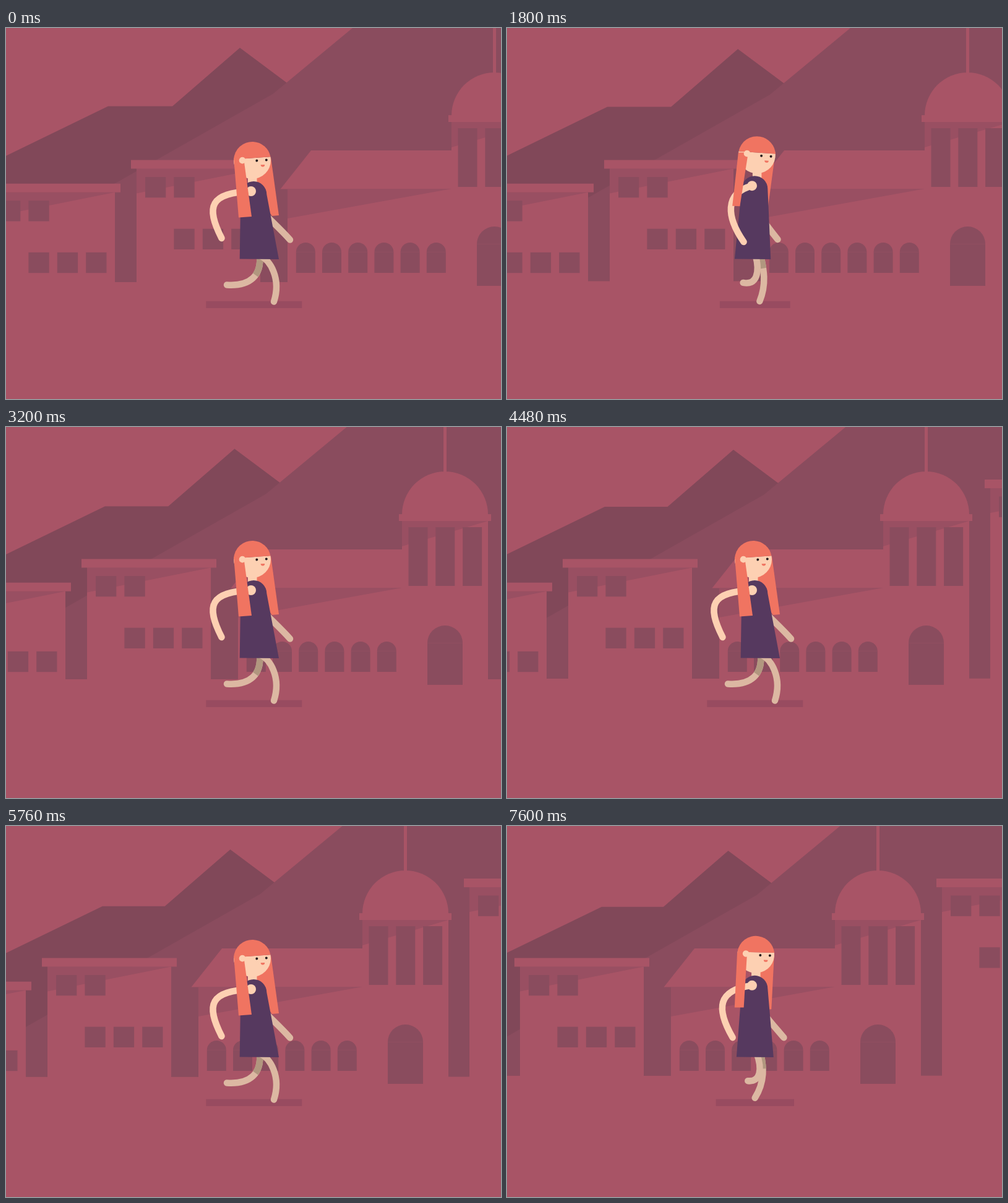
Animation, 800 px wide and 600 px high, one loop 7.64 s. Source, as an HTML page with a canvas:

```html
<!DOCTYPE html>
<html lang="en">
<head>
<meta charset="utf-8">
<title>Walking through town</title>
<style>
html, body { margin: 0; width: 100%; height: 100%; overflow: hidden; background: #a85466; }
canvas { display: block; }
</style>
</head>
<body>
<canvas id="stage" width="800" height="600"></canvas>
<script>
const ctx = document.getElementById('stage').getContext('2d');
const BASE = '#a85466', NEAR = '#8a4c5e', FAR = '#814859', SHADE = '#994f62', FLOOR = '#984b60';
const HAIR = '#f07461', SKIN = '#fdd0b2', DIM = '#dcb8a2', DARK = '#b1977f', DRESS = '#56395f';
const STEP = 40, LOOP = 7640, CYCLE = 640, TAU = 2 * Math.PI;

const mix = (a, b, k) => a + (b - a) * k;

function poly(color, ...p) {
  ctx.fillStyle = color;
  ctx.beginPath();
  for (let i = 0; i < p.length; i += 2) ctx.lineTo(p[i], p[i + 1]);
  ctx.fill();
}

function box(color, x, y, w, h) {
  ctx.fillStyle = color;
  ctx.fillRect(x, y, w, h);
}

function disc(color, x, y, r, from = 0, to = TAU) {
  ctx.fillStyle = color;
  ctx.beginPath();
  ctx.arc(x, y, r, from, to);
  ctx.fill();
}

function arch(x, top, w, bottom) {
  const r = w / 2;
  disc(NEAR, x + r, top + r, r, Math.PI);
  box(NEAR, x, top + r, w, bottom - top - r);
}

// One bent limb; a length limits it to its upper part.
function limb(color, p, length) {
  ctx.strokeStyle = color;
  ctx.lineWidth = 10.5;
  ctx.lineCap = length ? 'butt' : 'round';
  ctx.setLineDash(length ? [length, 999] : []);
  ctx.beginPath();
  ctx.moveTo(p[0], p[1]);
  ctx.bezierCurveTo(...p.slice(2));
  ctx.stroke();
}

function mountains(k) {
  const layer = (shift, color, ...points) => {
    const s = 1 - 0.04 * k;
    ctx.save();
    ctx.translate(-135 + shift * k, 230);
    ctx.scale(s, s);
    ctx.translate(135, -230);
    poly(color, ...points);
    ctx.restore();
  };
  layer(0, FAR, -100, 255.5, 165, 126.5, 269, 126.5, 378, 32, 520, 138, 520, 411, -100, 411);
  layer(-5, NEAR, -100, 408, 431.5, 106.5, 560, 0, 680, -100, 1000, -100, 1000, 411, -100, 411);
}

function house(x, y) {
  ctx.save();
  ctx.translate(x, y);
  box(BASE, 9, 14, 200, 400);
  poly(SHADE, 9, 14, 209, 14, 9, 54);
  box(BASE, 0, 0, 218, 14);
  for (let i = 0; i < 5; i++) {
    const row = i < 2 ? 0 : 1;
    box(NEAR, 23 + (i - row) * 46.4, 27.5 + row * 83.7, 33.3, 33.3);
  }
  ctx.restore();
}

function hall() {
  box(BASE, 455, 260, 266, 200);
  poly(BASE, 443.5, 260.5, 493, 198, 721, 198, 721, 260.5);
  poly(SHADE, 455, 260, 720, 260, 455, 308);
  for (let i = 0; i < 6; i++) arch(468.8 + i * 42.2, 347, 31, 396);
}

function tower() {
  box(BASE, 720, 152, 139, 300);
  poly(SHADE, 720, 152, 859, 152, 720, 193);
  disc(BASE, 789.5, 141.5, 69.5, Math.PI);
  box(BASE, 715, 141, 149, 11);
  box(BASE, 787, 0, 5, 80);
  for (let i = 0; i < 3; i++) box(NEAR, 730.5 + i * 43.8, 162, 31, 95);
  arch(761, 321, 57, 417);
}

function town(shift) {
  ctx.save();
  ctx.translate(-shift, 0);
  house(-33, 251.7);
  house(202, 213.5);
  hall();
  tower();
  house(884, 85);
  ctx.restore();
}

// Phase 0 puts the arm fully back; it sags on its way back from the front.
function arm(phase, shoulder) {
  const swing = Math.sin(TAU * phase);
  const ease = (1 - Math.cos(TAU * phase)) / 2;
  const k = ease + 0.4 * Math.max(0, swing) * (1 - ease);
  const sag = k * Math.max(0, -swing);
  return [396, shoulder,
    mix(330, 398, k), shoulder + mix(3, 24, k) + 10 * sag,
    mix(322, 428, k), mix(288, 308, k) + 40 * sag,
    mix(348.5, 459, k), mix(340, 342.5, k) + 18 * sag];
}

// Phase 0 plants the foot in front; half a cycle later it trails and swings forward.
function leg(phase) {
  const swings = phase >= 0.5;
  const u = phase * 2 % 1;
  const stride = (u + u ** 8) / 2;
  const k = swings ? 1 - stride : stride;
  const bend = 9 * Math.sin(Math.PI * u);
  const footY = swings
    ? 415.5 + 27 * u ** 8 + 6 * Math.sin(TAU * u)
    : 442.5 - 27 * u ** 8;
  return [swings ? 410 - bend : 410, 368,
    mix(427, 413, k) - bend, mix(375, 400, k) + bend / 2,
    mix(445, 395, k) - bend, mix(405, 418, k) + bend / 3,
    mix(433, 357, k), footY];
}

// Runs a drawing in the tilted frame of the head.
function tilted(x, y, angle, paint) {
  ctx.save();
  ctx.translate(x, y);
  ctx.rotate(angle);
  paint();
  ctx.restore();
}

function head(x, y, sway) {
  const angle = -0.07 * sway;
  tilted(x, y, angle, () => {
    disc(SKIN, 0, 0, 30, -0.12, Math.PI + 0.12);
    disc(HAIR, 0, 0, 30, Math.PI + 0.12, -0.12);
  });
  poly(HAIR, x - 30, y - 4, 370 + 6 * sway, 297 + 9.5 * sway,
    386.5 + 10.5 * sway, 296.5 + 8.5 * sway, x - 14, y - 4);
  tilted(x, y, angle, () => {
    disc(SKIN, -16, -1, 5.3);
    for (const eye of [7.3, 22.8]) disc('#241a1e', eye, 1, 2);
    disc(HAIR, 16.3, 8.3, 3.3, 0, Math.PI);
  });
}

function girl(t) {
  const near = t / CYCLE % 1, far = (near + 0.5) % 1;
  // The body bobs and leans once per step, a little behind the legs.
  const lag = 0.35;
  const sway = Math.cos(2 * TAU * near - lag) / Math.cos(lag);
  const x = 401 - 3 * sway, y = 209.5 + 4.5 * sway;
  const chest = y + 55, shoulder = y + 50;
  const shadow = 67 + 10.5 * sway;

  box(FLOOR, 400.8 - shadow, 441.7, 2 * shadow, 11.3);
  limb(DIM, arm(far, shoulder));
  limb(DIM, leg(far));
  limb(DARK, leg(far), 27 + 6 * sway);
  limb(DIM, leg(near));

  const backX = 431 + 10 * sway, backY = 298 + 5 * sway;
  poly(HAIR, x + 30, y - 5, backX, backY, backX - 11, backY + 1, 404, chest, x + 3, y + 15);
  box(SKIN, x - 7, y + 20, 14.5, 22);

  ctx.fillStyle = DRESS;
  ctx.beginPath();
  ctx.arc(400.3, chest, 21, Math.PI, 0);
  ctx.lineTo(433.5 + 7.5 * sway, 374);
  ctx.lineTo(372.7 + 5 * sway, 373.5);
  ctx.fill();

  limb(SKIN, arm(near, shoulder));
  disc(SKIN, 396, shoulder, 8);
  head(x, y, sway);
}

function draw(now) {
  const frame = Math.floor((now % LOOP) / STEP);
  box(BASE, 0, 0, 800, 600);
  mountains(frame / 190);
  town(frame);
  girl(frame * STEP);
  requestAnimationFrame(() => draw(performance.now()));
}
draw(0);
</script>
</body>
</html>
```
